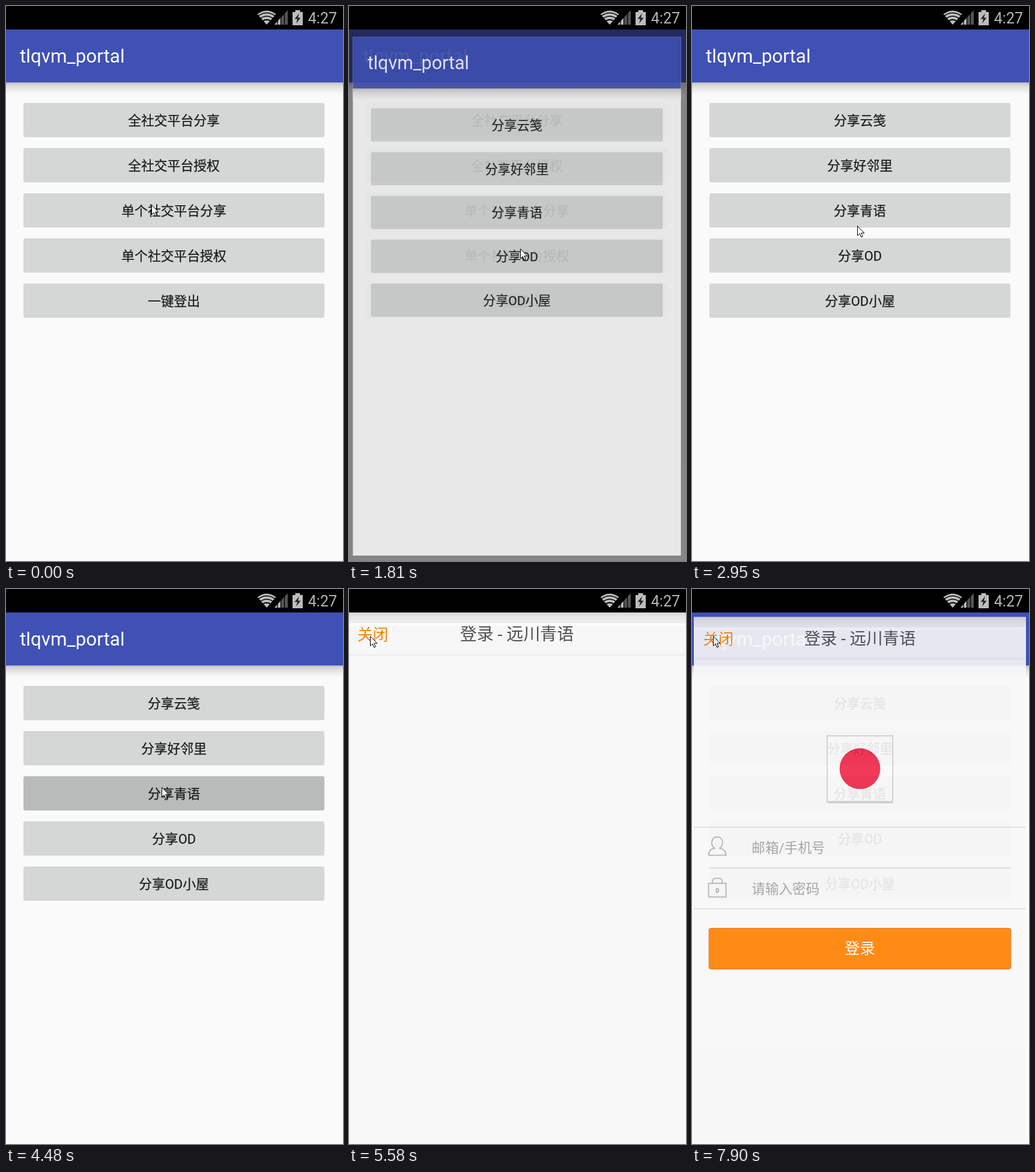
An HTML page that plays this animation: 561 px wide and 922 px high, repeating every 8000 ms.

```html
<!DOCTYPE html>
<html lang="zh-CN">
<head>
<meta charset="utf-8">
<title>Share demo</title>
<style>
html, body { margin: 0; width: 100%; height: 100%; overflow: hidden; background: #000; }
#stage { position: relative; width: 561px; height: 922px; overflow: hidden; background: #000;
  font: 21.8px Roboto, "Noto Sans CJK SC", "Noto Sans CJK", sans-serif; color: #1a1b1b; }
#stage div, #stage svg { position: absolute; white-space: nowrap; }
#status { left: 0; top: 0; width: 561px; height: 39px; background: #000; }
#clock { right: 10px; line-height: 42px; font-size: 25px; color: #b6b6b6; }

/* A page is a little larger than the stage and scales about the screen centre. */
#stage .page { left: -2px; top: 39px; width: 563px; height: 888px;
  transform-origin: 282px 422px; background: #fafafa; }
.page::after { content: ""; position: absolute; inset: 0; background: #000; opacity: var(--dim, 0); }
.inner { left: 2px; top: -39px; width: 559px; }
.bar { left: -2px; top: 39px; width: 563px; height: 88px; background: #3f51b5; }
.bar span { position: absolute; left: 25px; font-size: 31.4px; line-height: 90px; color: #fff; }
.shade { left: -2px; top: 127px; width: 563px; height: 20px;
  background: linear-gradient(#bfbfbf, #d9d9d9 25%, #ebebeb 60%, #fafafa); }
.button { left: 29px; width: 501px; height: 57px; line-height: 60px; border-radius: 3px;
  background: #d5d7d6; text-align: center; -webkit-text-stroke: .25px; }
.button.down { background: #b9bbba; }

#stage #web { background: #f8f8f8; }
.top { left: -2px; top: 39px; width: 563px; height: 69px; border-bottom: 3px solid #eeeeee;
  background: linear-gradient(#d6d6d6, #e6e6e6 7px, #efefef 18px, #fdfdfd 18px, #fdfdfd 22px, #f7f7f7 22px); }
#close { left: 14px; top: 55px; line-height: 42px; font-size: 25.6px; color: #ff8200; }
#title { left: 0; top: 55px; width: 559px; line-height: 42px; font-size: 28px; text-align: center; color: #4f4f4f; }
#progress { left: 0; top: 112.5px; height: 5px; background: #3c7fe0; }
.logo { left: 223px; top: 239px; width: 109px; height: 109px; border: 2px solid #d2d2d2;
  background: #fafafa; box-shadow: 0 2px 1px #ccc; }
.logo div { left: 20px; top: 20px; width: 69px; height: 69px; border-radius: 50%; background: #f0284b; }
.line { height: 1.4px; background: #c4c4c4; }
.hint { left: 96px; line-height: 46px; font-size: 23px; color: #a2a2a2; }
.login { left: 23px; top: 565px; width: 511px; height: 68px; line-height: 69px; border: 1px solid #dd6a1c;
  border-radius: 4px; background: #ff8100; color: #fff; font-size: 26px; text-align: center; }
.icons { left: 0; top: 0; fill: none; stroke: #b0b0b0; stroke-width: 1.8; }
.icons text { fill: #999; stroke: none; font: bold 11px Roboto, sans-serif; text-anchor: middle; }
#cursor { left: 0; top: 0; fill: #fff; stroke: #000; stroke-linejoin: round; }
</style>
</head>
<body>
<div id="stage">
  <div id="home" class="page"></div>
  <div id="menu" class="page"></div>
  <div id="web" class="page"><div class="inner">
    <div class="top"></div>
    <div id="close">关闭</div>
    <div id="title"></div>
    <div id="progress"></div>
    <div id="form">
      <div class="logo"><div></div></div>
      <div class="line" style="left:-2px;top:394px;width:563px"></div>
      <div class="line" style="left:23px;top:462.5px;width:513px"></div>
      <div class="line" style="left:-2px;top:531.5px;width:563px"></div>
      <svg class="icons" width="80" height="540">
        <path d="M23 442 C23 434 27 431 33 430 C25 424 28 411 37.7 411 C47 411 50 424 42 430 C48 431 52.5 434 52.5 442 Z"/>
        <path d="M23 489.5 H52.5 V512.5 H23 Z M29.5 489 V486 Q30 481 35 481 H40.5 Q45.5 481 46 486 V489"/>
        <text x="37.7" y="506">0</text>
      </svg>
      <div class="hint" style="top:408px">邮箱/手机号</div>
      <div class="hint" style="top:477px">请输入密码</div>
      <div class="login">登录</div>
    </div>
  </div></div>
  <div id="status">
    <svg width="561" height="39" fill="#bdbdbd">
      <path d="M434 31 L418.5 13.5 Q434 2 449.5 13.5 Z"/>
      <g fill="none" stroke="#000" stroke-width="1.7">
        <path d="M419 17 Q434 6 449 17 M422 21.5 Q434 12.5 446 21.5 M426 26 Q434 19.5 442 26"/>
      </g>
      <path fill="#555" d="M447 31 L469 7 V31 Z"/>
      <path d="M447 31 L457 20 V31 Z"/>
      <path stroke="#000" stroke-width="1.3" d="M452 8 V32 M457.5 8 V32 M463.5 8 V32"/>
      <path d="M477 10 H481.5 V7 H489.5 V10 H494 V32 H477 Z"/>
      <path fill="#222" d="M488 12 L480.5 21.5 H485 L483 29 L490.5 19.5 H486 Z"/>
    </svg>
    <div id="clock">4:27</div>
  </div>
  <svg id="cursor" width="14" height="21"><path d="M.5 .5 V16.5 L4.2 13.2 L6.7 19 L9.2 18 L6.7 12.2 H11.7 Z"/></svg>
</div>
<script>
const $ = id => document.getElementById(id);
const LOOP = 8000;
const FULL = [1, 1, 0];
const LOGIN = '登录 - 远川青语';

function fillList(id, labels) {
  const buttons = labels.map((label, i) =>
    `<div class="button" style="top:${161 + 75 * i}px">${label}</div>`).join('');
  $(id).innerHTML = `<div class="inner"><div class="bar"><span>tlqvm_portal</span></div>
    <div class="shade"></div>${buttons}</div>`;
}
fillList('home', ['全社交平台分享', '全社交平台授权', '单个社交平台分享', '单个社交平台授权', '一键登出']);
fillList('menu', ['分享云笺', '分享好邻里', '分享青语', '分享OD', '分享OD小屋']);

// Time, pointer x and y, changes. menu and web hold [scale, opacity, dim of the page below].
const steps = [
  [0, 242, 330, { menu: null, web: null, press: '', title: '加载中....', progress: 5, form: false, close: 1 }],
  [1000, 247, 343],
  [1150, 248, 343],
  [1430, 248, 343, { press: 'home' }],
  [1550, 248, 343, { press: '' }],
  [1690, 264, 369, { menu: [.86, .32, .18] }],
  [1810, 285, 403, { menu: [.97, .85, .47] }],
  [1960, 287, 406, { menu: FULL }],
  [2270, 282, 365],
  [2390, 274, 317],
  [2950, 275, 365],
  [3100, 251, 307],
  [3250, 250, 275],
  [3400, 250, 271],
  [3520, 255, 304],
  [3640, 259, 329],
  [4480, 259, 329, { press: 'menu' }],
  [4610, 248, 313, { press: '', web: [.88, .42, .25] }],
  [4730, 229, 287, { web: [.978, .94, .535] }],
  [4880, 215, 266, { web: FULL }],
  [5000, 202, 247],
  [5150, 127, 167],
  [5310, 60, 96, { title: LOGIN, progress: 156 }],
  [5460, 38, 80, { progress: 0 }],
  [5580, 35, 78],
  [6600, 35, 78, { form: true }],
  [7760, 35, 78, { close: .4 }],
  [7900, 35, 78, { close: 1, web: [.982, .91, 0] }]
];

function showPage(id, below, pose) {
  const page = $(id);
  page.style.visibility = pose ? 'visible' : 'hidden';
  const [scale, opacity, dim] = pose || FULL;
  page.style.transform = scale === 1 ? 'none' : `scale(${scale})`;
  page.style.opacity = opacity;
  $(below).style.setProperty('--dim', dim);
}

function render(time) {
  const state = {};
  for (const [start, x, y, changes] of steps) {
    if (start <= time) Object.assign(state, { x, y }, changes);
  }
  showPage('menu', 'home', state.menu);
  showPage('web', 'menu', state.web);
  for (const id of ['home', 'menu']) {
    $(id).querySelectorAll('.button')[2].classList.toggle('down', state.press === id);
  }
  $('title').textContent = state.title;
  $('progress').style.width = state.progress + 'px';
  $('form').style.display = state.form ? 'block' : 'none';
  $('close').style.opacity = state.close;
  $('cursor').style.transform = `translate(${state.x}px, ${state.y}px)`;
}

const begin = performance.now();
function tick() {
  render((performance.now() - begin) % LOOP);
  requestAnimationFrame(tick);
}
tick();
</script>
</body>
</html>
```
